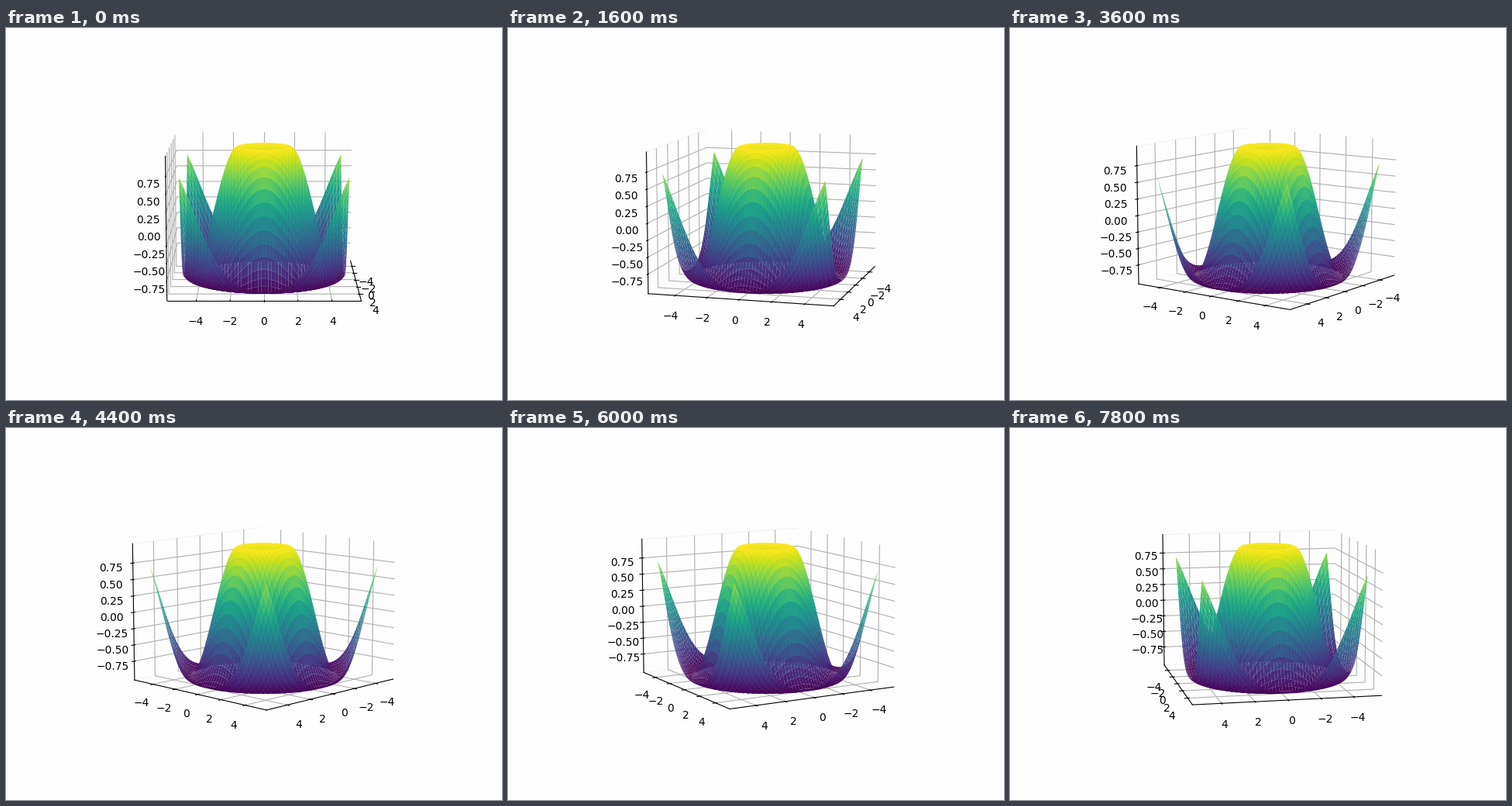
Animation, 640 px wide and 480 px high, one loop 8000 ms. Source, as a matplotlib script:

```python
import numpy as np
import matplotlib.pyplot as plt
from matplotlib.animation import FuncAnimation

FRAMES = 40
STEP_DEG = 2
ELEVATION = 10
PAPER = "#fdfdfd"

plt.rcParams.update({"figure.facecolor": PAPER, "axes.facecolor": PAPER})


def padded(low, high, margin):
    pad = (high - low) * margin
    return low - pad, high + pad


# Radial wave
side = np.linspace(-5, 5, 100)
x, y = np.meshgrid(side, side)
z = np.sin(np.hypot(x, y))

fig = plt.figure(figsize=(6.4, 4.8), dpi=100)
ax = fig.add_subplot(projection="3d")
ax.plot_surface(x, y, z, cmap="viridis")

# Axis box slightly larger than the data
span = padded(-5.5, 5.5, 1 / 48)
ax.set_xlim(*span)
ax.set_ylim(*span)
ax.set_zlim(*padded(z.min(), z.max(), 1 / 48))
ax.set_xticks(range(-4, 5, 2))
ax.set_yticks(range(-4, 5, 2))
ax.set_zticks(np.arange(-0.75, 0.76, 0.25))

# Unfilled walls; only the y wall keeps a faint outline
for axis, edge in ((ax.xaxis, PAPER), (ax.yaxis, "#ececec"), (ax.zaxis, PAPER)):
    axis.pane.set_fill(False)
    axis.pane.set_edgecolor(edge)


def update(frame):
    ax.view_init(elev=ELEVATION, azim=frame * STEP_DEG)
    return []


anim = FuncAnimation(fig, update, frames=FRAMES, interval=200,
                     init_func=lambda: update(0), repeat=True, repeat_delay=0)
plt.show()
```
